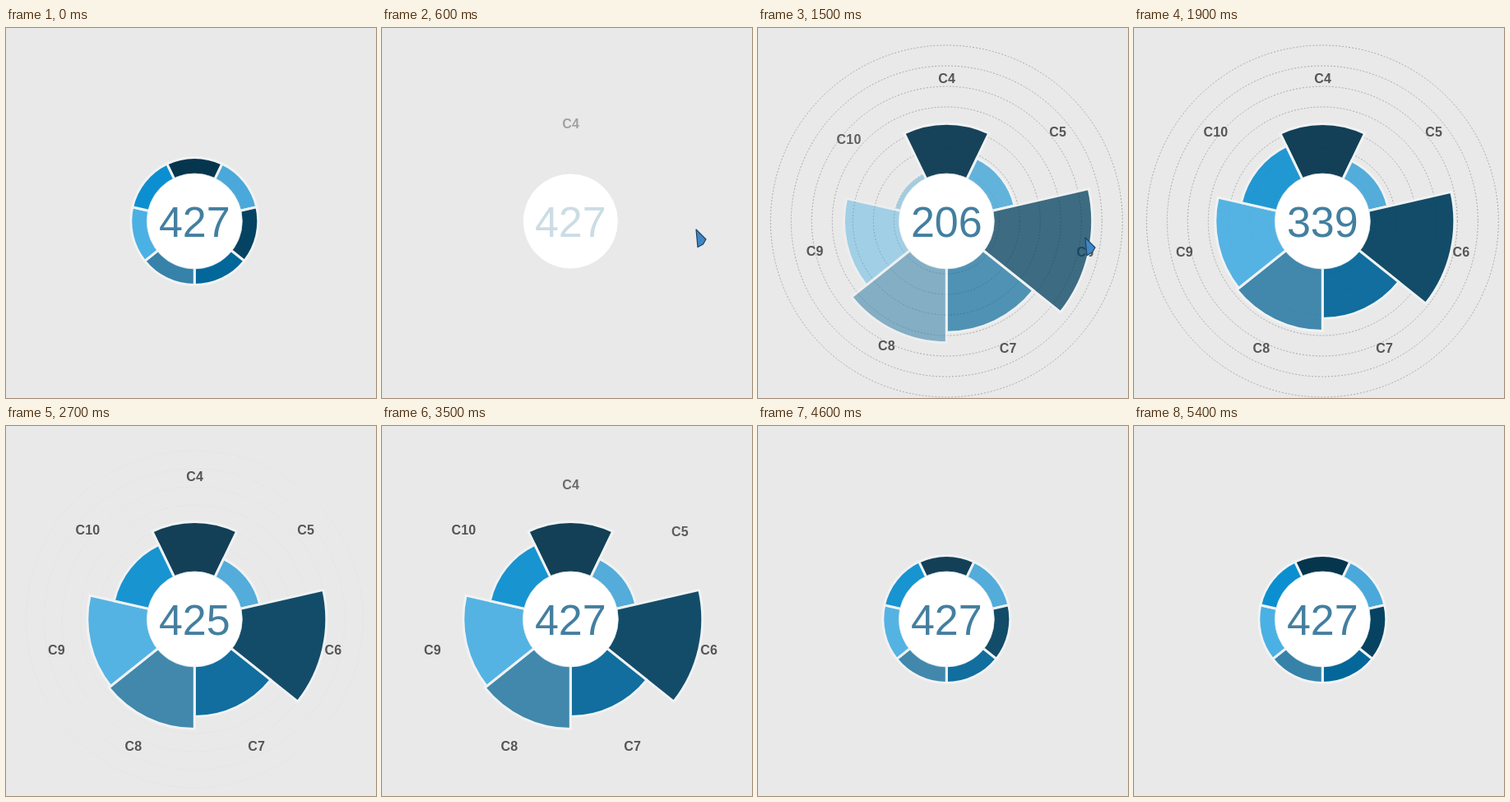
Write an HTML page that moves like this. It is 450 by 450 pixels and loops after 5500 ms.

```html
<!DOCTYPE html>
<html lang="en">
<head>
<meta charset="utf-8">
<title>Radial chart</title>
<style>
  html, body { margin: 0; width: 100%; height: 100%; overflow: hidden; background: #e9e9e9; }
  svg { display: block; width: 100%; height: 100%; }
  text { font-family: "Liberation Sans", Arial, sans-serif; }
  .label { font-size: 16px; font-weight: bold; letter-spacing: .2px; fill: #555; }
  .total { font-size: 52px; fill: #437fa0; text-anchor: middle; }
  .grid { fill: none; stroke: #a9a9a9; stroke-dasharray: 2 2; }
  .wedge { stroke: #f1f3f4; stroke-width: 3; }
</style>
</head>
<body>
<svg id="stage" viewBox="0 0 450 450"></svg>
<script>
const LOOP = 5500, STEP = 100;
const CX = 229.3, CY = 235, HUB = 58, RING = 76;
const LABEL_IN = 108, LABEL_OUT = 172.5;
const SLICE = Math.PI * 2 / 7;

const slices = [
  { name: 'C4', r: 117, color: '#06364e' },
  { name: 'C5', r: 80, color: '#4aa9da' },
  { name: 'C6', r: 159, color: '#064362' },
  { name: 'C7', r: 117, color: '#04679a' },
  { name: 'C8', r: 132, color: '#3782a9' },
  { name: 'C9', r: 129, color: '#4bb0e3' },
  { name: 'C10', r: 99, color: '#0c8fd0' }
];

// [time, value] tracks
const tracks = {
  total: [[850, 0], [1100, 80], [1500, 206], [1900, 339], [2300, 405], [2700, 425], [2900, 427]],
  oldTotal: [[100, 1], [700, .12], [1100, .12], [1300, 0]],
  gridStep: [[600, 32], [700, 31], [1100, 24], [1300, 25], [2100, 25], [2900, 21]],
  gridAlpha: [[600, 0], [1000, 1], [2100, 1], [2700, .1], [3000, 0]],
  cursorX: [[100, 256], [600, 382], [1100, 389.5], [1500, 398], [1900, 460]],
  cursorY: [[100, 174], [600, 245], [1100, 251], [1500, 255], [1900, 330]]
};

const stage = document.getElementById('stage');

function set(el, attrs) {
  for (const key in attrs) el.setAttribute(key, attrs[key]);
}

function add(tag, attrs) {
  const el = document.createElementNS('http://www.w3.org/2000/svg', tag);
  set(el, attrs);
  return stage.appendChild(el);
}

const clamp = x => Math.min(1, Math.max(0, x));
const phase = (t, start, length) => clamp((t - start) / length);
const mix = (a, b, p) => a + (b - a) * p;
const easeOut = x => 1 - (1 - x) ** 2;
const easeInOut = x => x < .5 ? 2 * x * x : 1 - 2 * (1 - x) ** 2;
const backOut = x => 1 + 3.1 * (x - 1) ** 3 + 2.1 * (x - 1) ** 2;

function sample(track, t) {
  const i = track.findIndex(k => k[0] > t);
  if (i === 0) return track[0][1];
  if (i < 0) return track[track.length - 1][1];
  const [t0, a] = track[i - 1], [t1, b] = track[i];
  return mix(a, b, (t - t0) / (t1 - t0));
}

function polar(r, angle) {
  return [CX + r * Math.sin(angle), CY - r * Math.cos(angle)];
}

function wedgePath(i, r) {
  const [x0, y0] = polar(r, (i - .5) * SLICE);
  const [x1, y1] = polar(r, (i + .5) * SLICE);
  return `M${CX} ${CY}L${x0} ${y0}A${r} ${r} 0 0 1 ${x1} ${y1}Z`;
}

const rings = Array.from({ length: 7 }, () => add('circle', { class: 'grid', cx: CX, cy: CY }));
const labels = slices.map(s => {
  const el = add('text', { class: 'label' });
  el.textContent = s.name;
  return el;
});
const wedges = slices.map(s => add('path', { class: 'wedge', fill: s.color }));
add('circle', { cx: CX, cy: CY, r: HUB, fill: '#fff', stroke: '#dfe8ee', 'stroke-width': .8 });
const oldTotal = add('text', { class: 'total', x: CX, y: 253.5 });
const total = add('text', { class: 'total', x: CX, y: 253.5 });
oldTotal.textContent = 427;
const cursor = add('path', {
  d: 'M0 0L12 12L8.5 18L2 21.5Z',
  fill: '#3f87c4', stroke: '#1c4262', 'stroke-width': 1.2, 'stroke-linejoin': 'round'
});

function drawWedge(el, i, t) {
  let r = RING, alpha = 1 - phase(t, 0, 600);
  if (t >= 700) {
    const grow = phase(t, 997 + i * 70, 520);
    const fall = easeInOut(phase(t, 3675 + i * 70, 545));
    r = Math.max(0, mix(slices[i].r * backOut(grow), RING, fall));
    alpha = grow ** .6 * mix(.94, 1, phase(t, 4600, 800));
  }
  set(el, { d: wedgePath(i, r + 1.5), opacity: alpha });
}

function drawLabel(el, i, t) {
  const rise = phase(t, 540 + i * 92, 770);
  const fall = phase(t, 3227 + i * 92, 510) ** 3;
  const [x, y] = polar(mix(mix(LABEL_IN, LABEL_OUT, easeOut(rise)), LABEL_IN, fall), i * SLICE);
  const shown = rise > 0 ? clamp(.4 + rise) : 0;
  set(el, { x: x - 10, y: y + 4.9, opacity: shown * (1 - fall) });
}

function draw(t) {
  const gap = sample(tracks.gridStep, t);
  const gridAlpha = sample(tracks.gridAlpha, t);
  rings.forEach((el, i) => set(el, { r: 139 + (3 - i) * gap, opacity: gridAlpha }));
  wedges.forEach((el, i) => drawWedge(el, i, t));
  labels.forEach((el, i) => drawLabel(el, i, t));

  total.textContent = Math.round(sample(tracks.total, t));
  set(total, { opacity: t >= 850 ? 1 : 0 });
  set(oldTotal, { opacity: sample(tracks.oldTotal, t) });
  set(cursor, {
    transform: `translate(${sample(tracks.cursorX, t)} ${sample(tracks.cursorY, t)})`,
    opacity: t >= 100 && t < 1900 ? 1 : 0
  });
}

const start = performance.now();
function tick(now) {
  const t = Math.max(0, now - start) % LOOP;
  draw(Math.floor(t / STEP) * STEP);
  requestAnimationFrame(tick);
}
draw(0);
requestAnimationFrame(tick);
</script>
</body>
</html>
```
